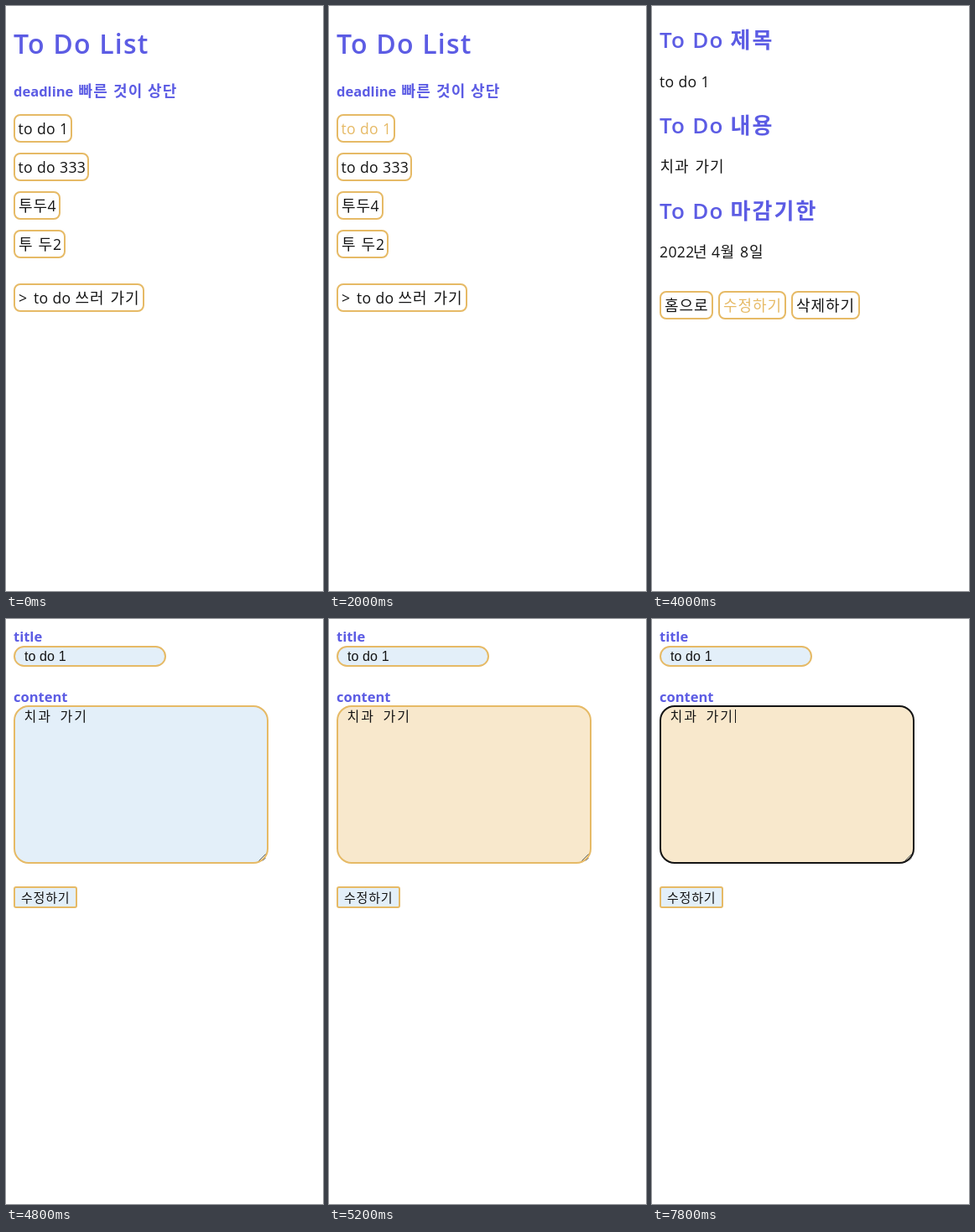
An HTML page with a canvas for the animation above (8000 ms loop, 378 by 698 pixels).

```html
<!DOCTYPE html>
<html lang="ko">
<head>
<meta charset="utf-8">
<title>To Do List</title>
<style>
html, body { margin: 0; width: 100%; height: 100%; overflow: hidden; background: #fff; }
canvas { display: block; width: 378px; height: 698px; }
</style>
</head>
<body>
<canvas id="stage"></canvas>
<script>
const W = 378, H = 698, LOOP = 8000;
const canvas = document.getElementById('stage');
const ctx = canvas.getContext('2d');
const ratio = window.devicePixelRatio || 1;
canvas.width = W * ratio;
canvas.height = H * ratio;

const INK = '#141414', VIOLET = '#5c5ce4', GOLD = '#e6ba66';
const BLUE = '#e3eff9', CREAM = '#f8e8cc';
const SANS = '"Open Sans", "Noto Sans CJK KR", "Noto Sans CJK", sans-serif';
const HANGUL = '"Noto Sans CJK KR", "Noto Sans CJK", sans-serif';

// [font, letter spacing, colour]
const STYLE = {
  h1: ['600 32px ' + SANS, 1.2, VIOLET],
  h2: ['600 26px ' + SANS, 1.2, VIOLET],
  h2k: ['bold 26px ' + HANGUL, 2.1, VIOLET],
  h3: ['bold 16.5px ' + SANS, 0, VIOLET],
  h3k: ['bold 18px ' + HANGUL, 1.2, VIOLET],
  body: ['17.6px ' + SANS, 0.35, INK],
  bodyk: ['350 18px ' + HANGUL, 0.9, INK],
  field: ['16px "Liberation Sans", Arial, sans-serif', 0.1, INK],
  area: ['300 16px ' + HANGUL, 2, INK],
  button: ['350 15px ' + HANGUL, 0.8, INK]
};

function text(str, x, y, name, color) {
  const [font, spacing, ink] = STYLE[name];
  ctx.font = font;
  ctx.letterSpacing = spacing + 'px';
  ctx.fillStyle = color || ink;
  ctx.fillText(str, x, y);
}

function box(x, y, w, h, r, fill, stroke = GOLD) {
  ctx.beginPath();
  ctx.roundRect(x + 1, y + 1, w - 2, h - 2, r - 1);
  ctx.fillStyle = fill;
  ctx.fill();
  ctx.lineWidth = 2;
  ctx.strokeStyle = stroke;
  ctx.stroke();
}

function link(x, y, w, words, hover) {
  box(x, y, w, 34, 8, '#fff');
  for (const [str, dx, name] of words) {
    text(str, x + dx, y + 23.5, name, hover && GOLD);
  }
}

function listPage(t) {
  text('To Do List', 9, 57, 'h1');
  text('deadline', 9, 107.5, 'h3');
  text('빠른', 86.5, 107.5, 'h3k');
  text('것이', 128, 107.5, 'h3k');
  text('상단', 169, 107.5, 'h3k');
  link(9, 129, 70, [['to do 1', 5.5, 'body']], t >= 1600);
  link(9, 175, 90, [['to do 333', 5.5, 'body']]);
  link(9, 221, 56, [['투두', 6, 'bodyk'], ['4', 40.5, 'body']]);
  link(9, 267, 62, [['투', 6, 'bodyk'], ['두', 29.5, 'bodyk'], ['2', 47, 'body']]);
  link(9, 331, 156, [['>', 6, 'body'], ['to do', 24, 'body'],
    ['쓰러', 73.5, 'bodyk'], ['가기', 115.5, 'bodyk']]);
}

function detailPage(t) {
  [['제목', 50], ['내용', 152], ['마감기한', 254]].forEach(([str, y]) => {
    text('To Do', 9, y, 'h2');
    text(str, 93.5, y, 'h2k');
  });
  text('to do 1', 9, 97, 'body');
  text('치과', 9.5, 198, 'bodyk');
  text('가기', 51.5, 198, 'bodyk');
  text('2022', 9, 299.5, 'body');
  text('년', 49, 299.5, 'bodyk');
  text('4', 71, 299.5, 'body');
  text('월', 81.5, 299.5, 'bodyk');
  text('8', 105, 299.5, 'body');
  text('일', 116, 299.5, 'bodyk');
  link(9, 340, 64, [['홈으로', 6, 'bodyk']], t >= 3600 && t < 3800);
  link(79, 340, 81, [['수정하기', 6, 'bodyk']], t >= 3800);
  link(166, 340, 82, [['삭제하기', 6, 'bodyk']]);
}

function resizer() {
  ctx.beginPath();
  ctx.moveTo(301.5, 288.5);
  ctx.lineTo(309.5, 280.5);
  ctx.moveTo(306, 288.5);
  ctx.lineTo(309.5, 285);
  ctx.lineWidth = 1;
  ctx.strokeStyle = '#666';
  ctx.stroke();
}

function formPage(t) {
  const focused = t >= 5800;
  text('title', 9, 27, 'h3');
  box(9, 32, 182, 25, 12.5, BLUE);
  text('to do 1', 22, 50, 'field');
  text('content', 9, 99, 'h3');
  box(9, 103, 304, 189, 18, t >= 5200 ? CREAM : BLUE, focused ? INK : GOLD);
  text('치과', 21.5, 122, 'area');
  text('가기', 64.5, 122, 'area');
  resizer();
  // The caret turns off first at 6200 ms.
  const blink = Math.floor((t - 6200) / 530);
  if (focused && blink % 2) {
    ctx.fillStyle = INK;
    ctx.fillRect(99, 108, 1, 16);
  }
  box(9, 319, 76, 26, 3, BLUE);
  text('수정하기', 18, 337.5, 'button');
}

function draw(t) {
  ctx.setTransform(ratio, 0, 0, ratio, 0, 0);
  ctx.fillStyle = '#fff';
  ctx.fillRect(0, 0, W, H);
  if (t < 2200) listPage(t);
  else if (t < 4800) detailPage(t);
  else formPage(t);
}

const start = performance.now();
function tick() {
  draw((performance.now() - start) % LOOP);
  requestAnimationFrame(tick);
}
tick();
</script>
</body>
</html>
```
